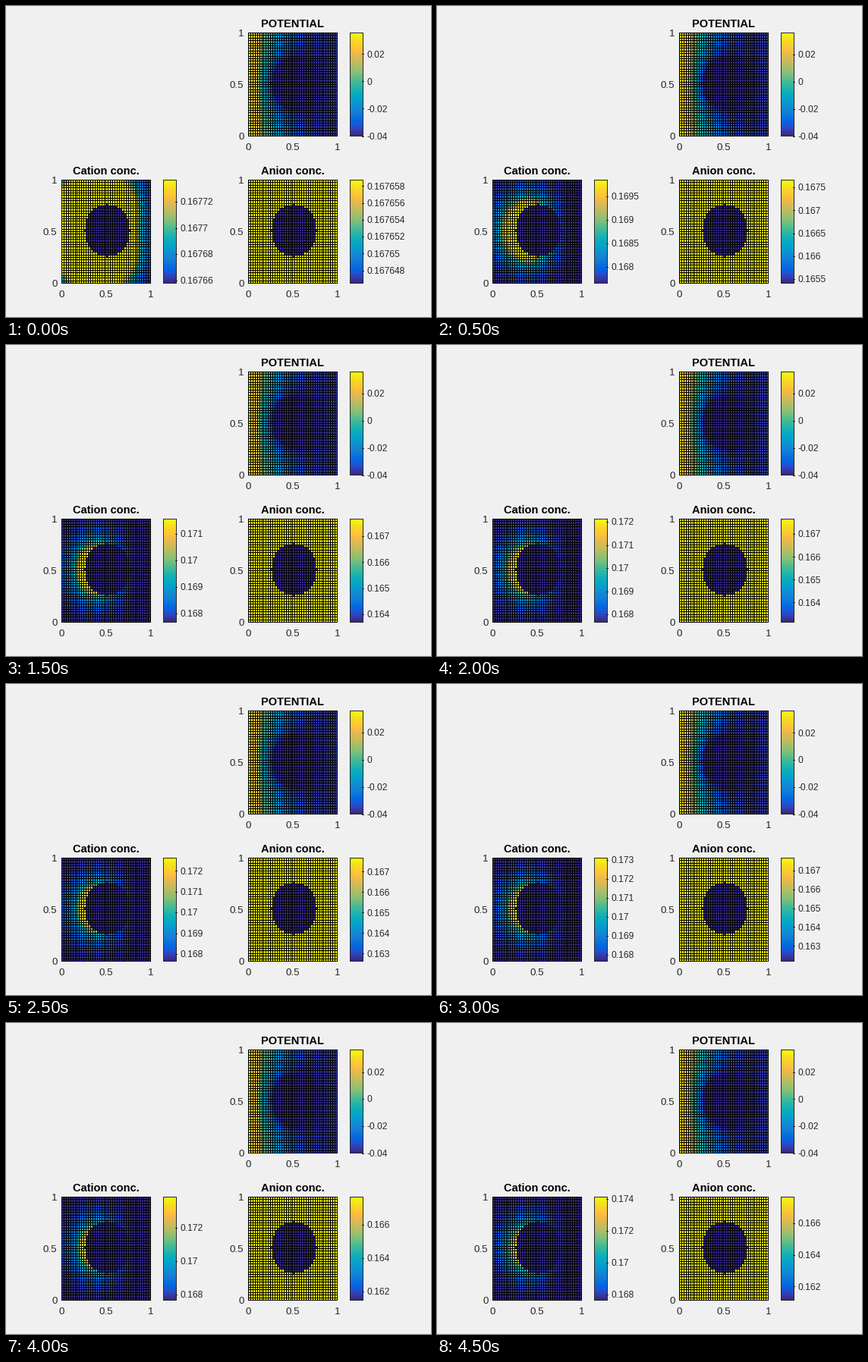
Recreate the animation shown at these times as a matplotlib script. Size 560 by 410 pixels, loop 5000 ms.

```python
import numpy as np
import matplotlib.pyplot as plt
from matplotlib.animation import FuncAnimation
from matplotlib.colors import LinearSegmentedColormap

W, H, DPI = 560, 410, 80
N = 40                      # cells per side
PW, PH = 117, 136           # plot size in pixels
INK = (0.15, 0.15, 0.15)
BULK = 0.167658

CMAP = LinearSegmentedColormap.from_list("parula", [
    (.2081, .1663, .5292), (.2081, .2386, .6771), (.1253, .3242, .8303),
    (.0060, .4086, .8828), (.0498, .4586, .8641), (.0779, .5040, .8384),
    (.0641, .5570, .8240), (.0265, .6137, .8135), (.0228, .6535, .7768),
    (.0590, .6838, .7254), (.1453, .7098, .6646), (.2586, .7317, .5954),
    (.3953, .7459, .5244), (.5300, .7491, .4661), (.6473, .7456, .4188),
    (.7525, .7384, .3768), (.8507, .7299, .3360), (.9450, .7261, .2886),
    (.9990, .7653, .2164), (.9789, .8271, .1633), (.9589, .8949, .1132),
    (.9763, .9831, .0538)], N=64)

# Upper limit for cations and lower limit for anions at each step
CATION_HI = [.1677363, .169845, .170835, .171562, .17212,
             .172618, .17308, .1735, .17383, .174118]
ANION_LO = [.1676465, .165408, .16441, .163693, .16313,
            .162627, .16219, .161807, .16146, .161128]
STEPS = len(CATION_HI)

X, Y = np.meshgrid(np.linspace(0, 1, N + 1), np.linspace(0, 1, N + 1))
R = np.hypot(X - .5, Y - .5)
DISC = R <= .25 + 1e-9


def solve_potential(left=.0356, right=-.0355, disc=-.04):
    """Laplace field between two walls, with a disc held at a fixed value."""
    p = left + (right - left) * X
    for _ in range(2500):
        p[DISC] = disc
        q = np.pad(p, ((1, 1), (0, 0)), mode="reflect")
        p[:, 1:-1] = (q[2:, 1:-1] + q[:-2, 1:-1] + p[:, 2:] + p[:, :-2]) / 4
    p[DISC] = disc
    return p


def cation_excess():
    """Cloud around the disc, strongest on the side facing the left wall."""
    c = (.5 - X) / np.maximum(R, 1e-9)
    d = np.maximum(R - .262, 0)
    back = np.maximum(-c, 0) ** 4
    e = np.exp(-1.45 * (1 - c) - 1.1 * back - d / .095 - (d / .5) ** 6)
    e[DISC] = 0
    return .00646 * e


POTENTIAL = solve_potential()
CATION = BULK + cation_excess()


def cell_index(size):
    lines = np.round(size * np.arange(N + 1) / N).astype(int)
    px = np.arange(size + 1)
    cell = np.clip(np.searchsorted(lines, px, "right") - 1, 0, N - 1)
    return cell, np.isin(px, lines)


COL, COL_LINE = cell_index(PW)
ROW, ROW_LINE = cell_index(PH)


def mesh_image(field, lo, hi):
    """Flat cells coloured by their lower-left node, with black edges."""
    u = np.clip((field[:-1, :-1] - lo) / (hi - lo), 0, 1)
    img = CMAP(u[::-1])[np.ix_(ROW, COL)][..., :3]
    img[ROW_LINE] = 0
    img[:, COL_LINE] = 0
    return img


def bar_image():
    img = np.repeat(CMAP(np.linspace(1, 0, PH + 1))[:, None, :3], 18, axis=1)
    img[[0, -1]] = INK
    img[:, [0, -1]] = INK
    return img


def tick_step(span):
    for limit, step in ((2e-5, 2e-6), (1e-4, 2e-5), (2.5e-3, 5e-4),
                        (5.6e-3, 1e-3), (1e-2, 2e-3)):
        if span < limit:
            return step
    return .02


plt.rcParams["font.family"] = "Liberation Sans"
fig = plt.figure(figsize=(W / DPI, H / DPI), dpi=DPI, facecolor="#f0f0f0")
ax = fig.add_axes([0, 0, 1, 1])
ax.axis("off")


def label(x, y, text, px, ha="center", **kw):
    return ax.text(x, y, text, fontsize=px * 72 / DPI, ha=ha,
                   va="baseline", **kw)


def picture(img, x, y):
    h, w = img.shape[:2]
    return ax.imshow(img, extent=(x, x + w, y + h, y), aspect="auto",
                     interpolation="nearest")


class Panel:
    def __init__(self, x, y, title):
        self.bar_x, self.y = x + 134, y
        self.mesh = picture(np.zeros((PH + 1, PW + 1, 3)), x, y)
        picture(bar_image(), self.bar_x, y)
        label(x + 58.8, y - 7, title, 14.67, weight="bold", color="black")
        for i, s in enumerate(("0", "0.5", "1")):
            label(x + .5 + i * PW / 2, y + 155, s, 13.33, color=INK)
            label(x - 5.5, y + 141.3 - i * PH / 2, s, 13.33, "right",
                  color=INK)
        self.labels = [label(x + 157, y, "", 12, "left", color=INK)
                       for _ in range(8)]
        self.marks = [ax.plot([], [], color=INK, lw=.9)[0] for _ in range(8)]

    def update(self, field, lo, hi):
        self.mesh.set_data(mesh_image(field, lo, hi))
        step = tick_step(hi - lo)
        first = int(np.ceil(lo / step - 1e-6))
        for i, (text, mark) in enumerate(zip(self.labels, self.marks)):
            v = (first + i) * step
            shown = v <= hi
            text.set_visible(shown)
            mark.set_visible(shown)
            if shown:
                y = self.y + PH * (hi - v) / (hi - lo) + .5
                text.set_text(f"{round(v, 6) + 0.0:g}")
                text.set_y(y + 4.2)
                mark.set_data([self.bar_x + 15.5, self.bar_x + 17.5], [y, y])


potential = Panel(319, 35, "POTENTIAL")
cation = Panel(73, 229, "Cation conc.")
anion = Panel(319, 229, "Anion conc.")
ax.set_xlim(0, W)
ax.set_ylim(H, 0)


def draw(k):
    potential.update(POTENTIAL, -.04, .0355 + .001 * k / (STEPS - 1))
    cation.update(CATION, BULK, CATION_HI[k])
    lo, hi = ANION_LO[k], BULK + 7e-7
    anion.update(np.where(DISC, lo, hi), lo, hi)
    return []


anim = FuncAnimation(fig, draw, frames=STEPS, interval=500,
                     init_func=lambda: draw(0), repeat=True, repeat_delay=0,
                     blit=False)
plt.show()
```
